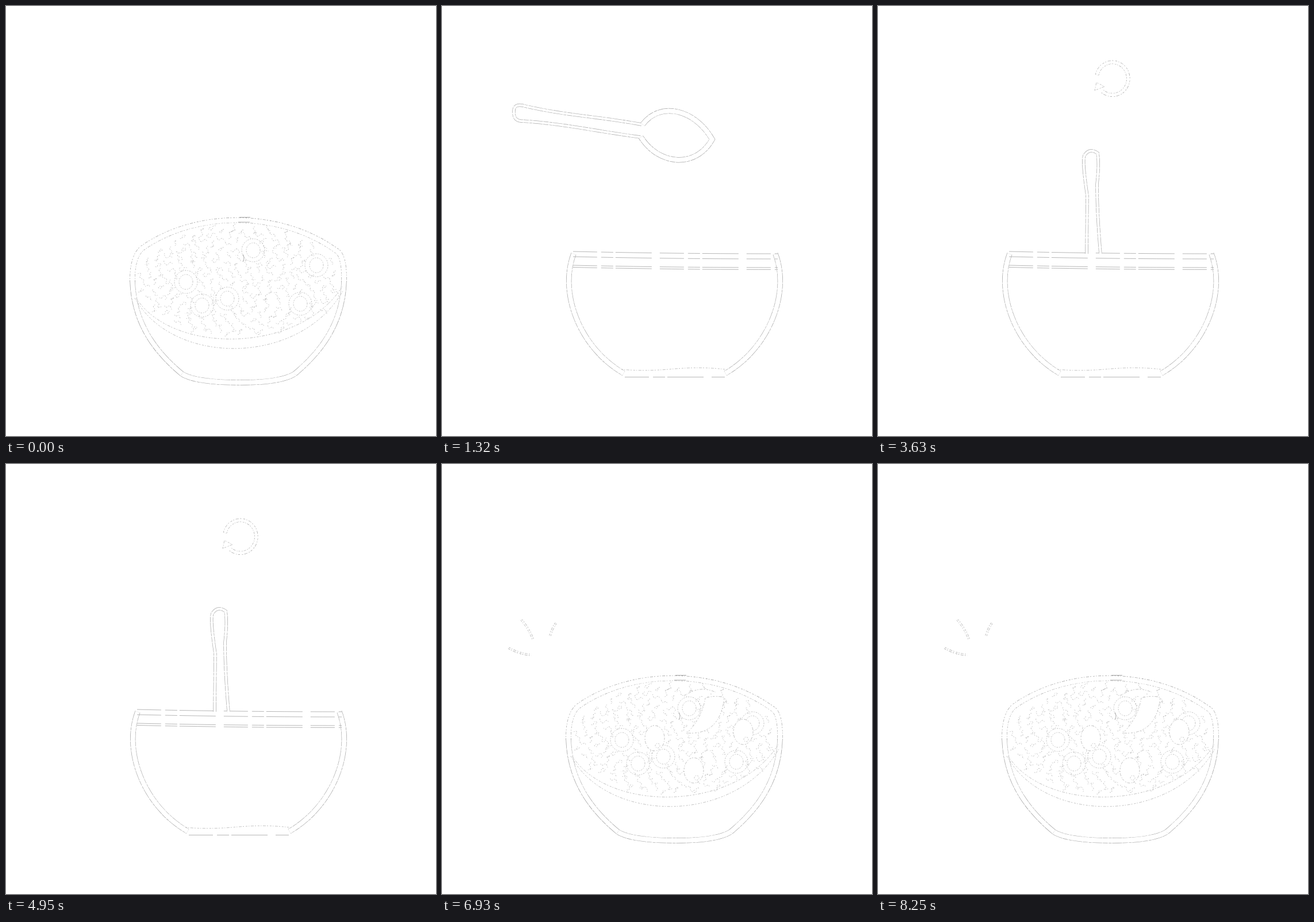
An HTML page for the animation above (8580 ms loop, 748 by 748 pixels).

```html
<!DOCTYPE html>
<html lang="en">
<head>
<meta charset="utf-8">
<title>Bowl</title>
<style>
html, body { margin: 0; width: 100%; height: 100%; overflow: hidden; background: #fff; }
svg { display: block; width: 100%; height: 100%; fill: none; stroke: #aaa; stroke-width: .7; }
.firm { stroke-dasharray: 17 1 9 1.5 5 1; }
.broken { stroke-dasharray: 3 2 1.5 2.5 5 2 2 3; }
.food { stroke-dasharray: 1.5 2 2.5 2; }
.rim { stroke-dasharray: 42 7 21 4 63 14; stroke: #999; }
.dark { stroke: #888; }
.blank { stroke: #fff; }
.cover { fill: #fff; }
</style>
</head>
<body>
<svg viewBox="0 0 748 748"><g id="scene"></g></svg>
<script>
const LOOP = 8580, STEP = 330;
const scene = document.getElementById('scene');

const path = (d, cls, extra = '') => `<path class="${cls}" d="${d}" ${extra}/>`;
// Both edges of a pen stroke of the given width.
const edges = (d, width, cls = 'firm') =>
  path(d, cls, `style="stroke-width:${width + 1.4}"`) +
  path(d, 'blank', `style="stroke-width:${width}"`);
const oval = (x, y, rx, ry, cls = 'food') =>
  `<ellipse class="${cls}" cx="${x}" cy="${y}" rx="${rx}" ry="${ry}"/>`;
const mirror = (axis, body) => `<g transform="matrix(-1 0 0 1 ${2 * axis} 0)">${body}</g>`;

function group(parent, body) {
  const g = document.createElementNS('http://www.w3.org/2000/svg', 'g');
  g.innerHTML = body;
  parent.append(g);
  return g;
}

function random(seed) {
  return () => (seed = seed * 16807 % 2147483647) / 2147483647;
}

// Short wavy strokes on a sunflower spiral, kept clear of the slices.
function meal() {
  const slices = [[313, 480], [430, 425], [540, 451], [512, 518], [341, 521], [385, 509]];
  const rnd = random(4217), count = 230;
  let d = '';
  for (let i = 0; i < count; i++) {
    const r = Math.sqrt((i + .5) / count), a = i * 2.4;
    const x = 405 + 174 * r * Math.cos(a), y = 478 + 96 * r * Math.sin(a);
    if (slices.some(([sx, sy]) => Math.hypot(x - sx, y - sy) < 20)) continue;
    const turn = rnd() * 6.28, size = 4 + rnd() * 3;
    const dx = size * Math.cos(turn), dy = size * Math.sin(turn);
    const p = [x - dx, y - dy, dx / 2 - dy * .7, dy / 2 + dx * .7, dx, dy].map(v => v.toFixed(1));
    d += `M${p[0]} ${p[1]}q${p[2]} ${p[3]} ${p[4]} ${p[5]}t${p[4]} ${p[5]}t${p[5]} ${p[4]}`;
  }
  return path(d, 'food') +
    slices.map(([x, y]) => oval(x, y, 20, 20) + oval(x, y, 12, 13)).join('') +
    path('M412 432q4 6 0 13', 'dark');
}

const side = edges('M220 478C222 550 258 600 306 640', 8);
const fullBowl = side + mirror(404, side) +
  edges('M306 640Q330 655 408 655Q478 655 502 640', 8) +
  edges('M220 480Q219 438 236 422C330 355 480 355 578 428Q589 440 588 480', 8, 'broken') +
  path('M406 367.5h19M404 376h20', 'dark') +
  path('M227 509C290 606 510 606 585 488M224 508C290 627 510 627 586 496', 'broken') +
  meal();

const wall = edges('M229 431C203 500 240 595 316 639', 8);
const emptyBowl = wall + mirror(404.5, wall) +
  path('M312 632Q350 636 400 631.5T492 632', 'broken') +
  path('M318 645.5H492', 'rim') +
  [427, 436, 451, 454.5].map(y => path(`M228 ${y}Q400 ${y + 4} 584 ${y + 4}`, 'rim')).join('');

const spoonShape =
  edges('M347 206C270 192 210 190 140 173Q124 170 125 185Q125 199 137 200C210 204 280 220 345 228', 4) +
  edges('M349 206C380 165 440 180 470 232C440 285 375 275 346 228', 8);
const leaning = edges('M480 432C510 380 545 325 556 287Q564 270 583 283Q586 290 572 308C545 345 525 385 505 432', 4);
const upright = edges('M363 431L364 330Q355 270 359 260Q368 246 382 256Q385 275 381 310Q381 360 387 431', 4);

const stirSign = edges('M381 120A27.5 28.5 0 1 1 390 148', 5, 'broken') +
  path('M377 147L380 133L394 140Z', 'broken cover');
const sparkLines = edges('M138 271Q152 287 159 307M198 277Q191 287 188 299M116 320Q135 331 156 332', 2, 'broken');

const tomato = (x, y) => oval(x, y, 17, 22, 'broken cover') + oval(x + 5, y + 13, 4, 4);
const toppingShapes =
  path('M421 404Q447 384 476 397M458 407Q452 443 426 468Q484 472 491 406Q475 402 458 407', 'broken cover') +
  tomato(370, 477) + tomato(524, 466) + tomato(438, 533);

const empty = group(scene, emptyBowl);
const spoon = group(scene, spoonShape);
const handles = {
  left: group(scene, mirror(383.5, leaning)),
  mid: group(scene, upright),
  right: group(scene, leaning)
};
const sign = group(scene, stirSign);
const dish = group(scene, '');
group(dish, fullBowl);
const toppings = group(dish, toppingShapes);
const sparks = group(dish, sparkLines);

const stir = ['left', 'mid', 'right', 'mid'];
const show = (el, on) => { el.style.display = on ? '' : 'none'; };

function draw(time) {
  const step = Math.floor(time % LOOP / STEP);
  const served = step < 2 || step >= 20;
  const stirring = step >= 6 && step < 16;
  const falling = step === 17 || step === 18;

  // The dish stays in place for falling toppings; only its bowl is hidden.
  show(dish, served || falling);
  show(dish.firstChild, served);
  show(empty, !served);
  show(toppings, falling || step >= 20);
  show(sparks, step >= 21);
  toppings.setAttribute('transform', falling ? `translate(-56 ${-325 + 167 * (step - 17)})` : '');

  const tilt = step >= 22 ? 15 * Math.cos((step - 22) * Math.PI / 2) : 0;
  dish.setAttribute('transform', `rotate(${tilt} 352 462)`);

  // The spoon tumbles along a parabola into the bowl.
  const k = step - 4;
  show(spoon, step >= 2 && step <= 5);
  spoon.setAttribute('transform',
    `translate(${-32 * k - 19 * k * k} ${98 * k - 15 * k * k}) rotate(${27.5 * k} 296 222)`);

  show(sign, stirring);
  for (const name in handles) show(handles[name], stirring && stir[(step + 2) % 4] === name);
}

const start = performance.now();
function tick() {
  draw(performance.now() - start);
  requestAnimationFrame(tick);
}
tick();
</script>
</body>
</html>
```
